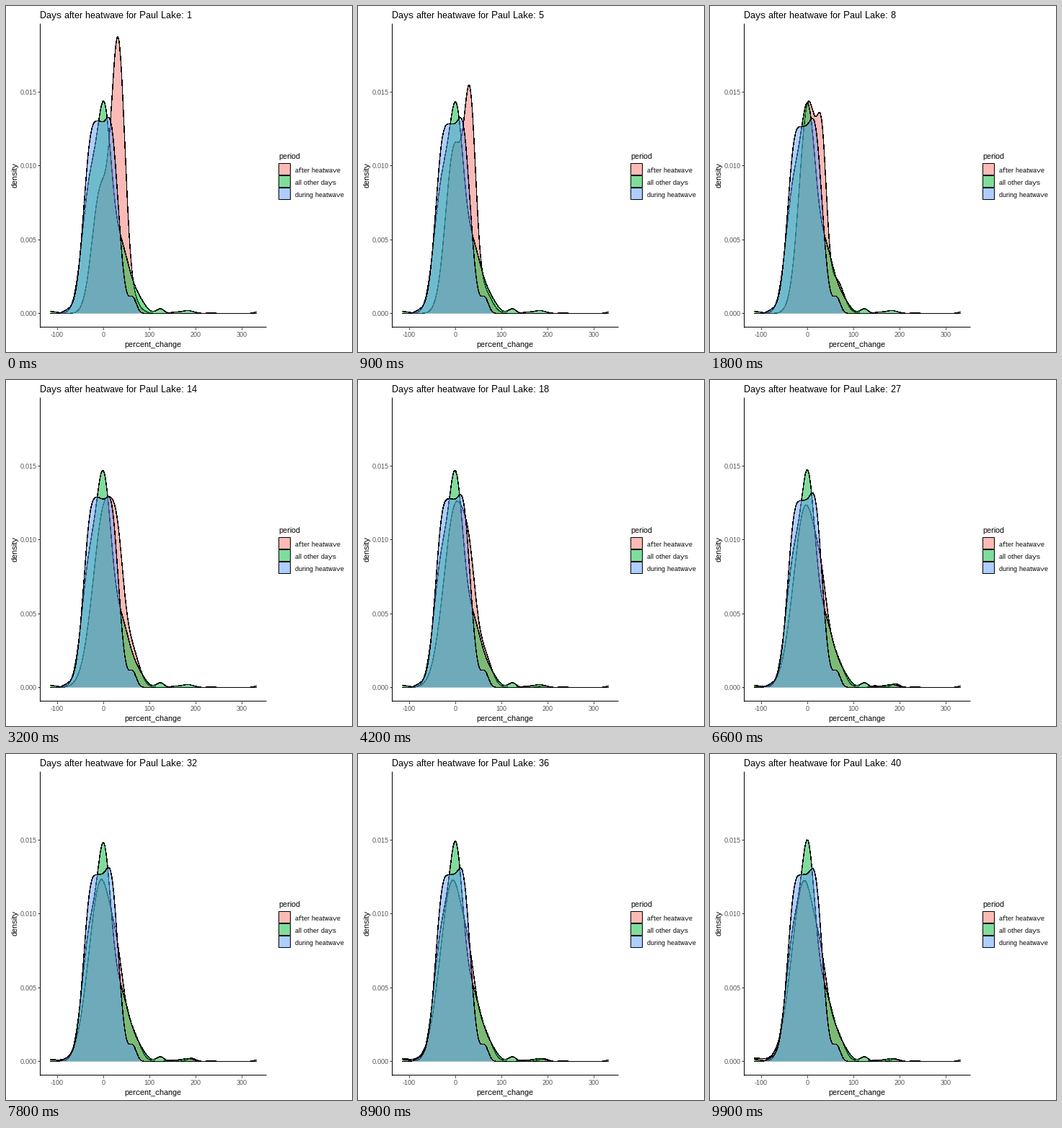
Write a matplotlib script that moves like this. It is 480 px wide and 480 px high and loops after 10000 ms.

```python
import numpy as np
import matplotlib.pyplot as plt
from matplotlib.animation import FuncAnimation
from matplotlib.patches import Polygon, Rectangle

plt.rcParams.update({
    "font.family": "Liberation Sans",
    "text.hinting": "native",
    "text.hinting_factor": 1,
})

FRAMES, DAYS = 100, 40
SIZE, BASE = 480, 426.5
COLORS = ["#F8766D", "#00BA38", "#619CFF"]
LABELS = ["after heatwave", "all other days", "during heatwave"]
GREY, DARK = "#4D4D4D", "#333333"

XS = np.linspace(61.4, 347.6, 512)
KEYS = [0, 18, 32, 54, 99]


def key(frame, *values):
    return np.interp(frame, KEYS, values)


def mix(*bumps):
    """Sum of bell curves given as (height, center, width) in pixels."""
    return sum(h * np.exp(-0.5 * ((XS - c) / w) ** 2) for h, c, w in bumps)


def after(f):
    tail = key(f, 0, 0, 0, 5.5, 3.5)
    return mix(
        (key(f, 168, 292, 255, 252, 250), key(f, 131, 136.5, 138, 133.5, 130.5),
         key(f, 11.5, 12.5, 16.5, 16.5, 17)),
        (key(f, 364, 165, 75, 62, 62), 155.7, key(f, 9.3, 6.5, 8, 8.5, 8.7)),
        (key(f, 15, 45, 40, 35, 36), 175.5, 10),
        (key(f, 0, 0, 0, 0, 4.5), 61, 14), (tail, 257, 6), (tail / 2, 229, 5))


def other(f):
    return mix(
        (165, 116, 11), (250, 137, 10), (85, 160, 11), (20, 182, 10),
        (key(f, 6, 5, 17, 12, 19), key(f, 134, 130, 130, 133, 134), 6),
        (2.8, 61, 9), (6.5, 214, 5), (1.5, 234, 6), (4, 252, 8),
        (1.3, 285, 4), (1.8, 347, 4))


def during(f):
    return mix(
        (235, 118.5, 10.8), (36, 131, 6), (252, 145, 10.5), (20, 176, 5),
        (4, 86, 6), (key(f, 8, 0, 5, 0, 0), 126, 7),
        (key(f, 1, 0, -6, 0, -3), 142, 6))


CURVES = [after, other, during]

fig = plt.figure(figsize=(SIZE / 72, SIZE / 72), dpi=72, facecolor="white")
ax = fig.add_axes([0, 0, 1, 1])
ax.set(xlim=(0, SIZE), ylim=(SIZE, 0))
ax.axis("off")


def segment(x, y, color="black"):
    ax.plot(x, y, color=color, lw=1, solid_capstyle="butt")


def label(x, y, text, size, color="black", **kw):
    return ax.text(x, y, text, fontsize=size, color=color, **kw)


segment([47, 47], [24, 446])
segment([47, 361], [445, 445])
for n in range(4):
    y = round(426 - 102.3 * n)
    segment([44, 47], [y, y], DARK)
    label(43, y + 4, f"{0.005 * n:.3f}", 9, GREY, ha="right")
for v in range(-100, 301, 100):
    x = round(135 + 0.64 * v)
    segment([x, x], [446, 449], DARK)
    label(x, 459, str(v), 9, GREY, ha="center")
label(204, 473, "percent_change", 11, ha="center")
label(13, 235, "density", 11, ha="center", va="center", rotation=90)

label(378, 212, "period", 11)
for n, (color, name) in enumerate(zip(COLORS, LABELS)):
    y = 218 + 17 * n
    ax.add_patch(Rectangle((378, y), 16, 16, fc=color, alpha=0.5, lw=0))
    ax.add_patch(Rectangle((378, y), 16, 16, fc="none", ec="black", lw=1))
    label(401, y + 13, name, 9)

title = label(47, 17, "", 13)
fills, lines = [], []
for n, color in enumerate(COLORS):
    area = Polygon([(0, 0), (1, 0), (1, 1)], fc=color, alpha=0.5, lw=0,
                   zorder=3 + 2 * n)
    fills.append(ax.add_patch(area))
    # A hairline without smoothing gives a crisp one-pixel outline.
    lines += ax.plot([], [], color="black", lw=0.4, antialiased=False,
                     zorder=4 + 2 * n)


def draw(frame):
    day = round(1 + (DAYS - 1) * frame / (FRAMES - 1))
    title.set_text(f"Days after heatwave for Paul Lake: {day}")
    for area, line, curve in zip(fills, lines, CURVES):
        y = BASE - curve(frame)
        line.set_data(XS, y)
        area.set_xy([(XS[0], BASE), *zip(XS, y), (XS[-1], BASE)])
    return [title, *fills, *lines]


anim = FuncAnimation(fig, draw, frames=FRAMES, interval=100, repeat=True,
                     repeat_delay=0, blit=False)
plt.show()
```
